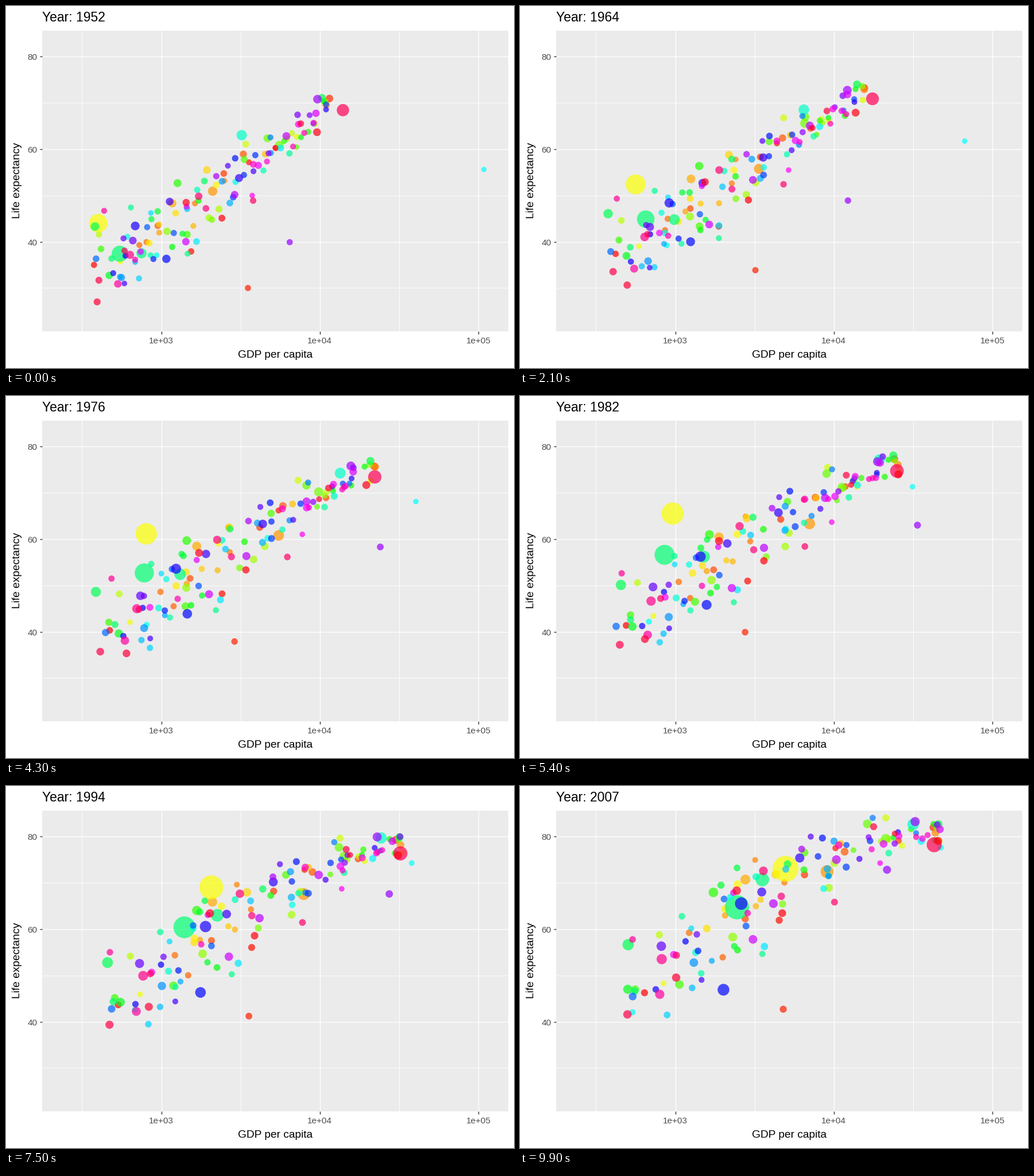
These frames come from a looping animation (885 px wide and 632 px high, 10 s). A matplotlib script:

```python
import numpy as np
import matplotlib.pyplot as plt
from matplotlib.animation import FuncAnimation
from matplotlib.colors import hsv_to_rgb
from matplotlib.patches import Rectangle

W, H, DPI = 885, 632, 100
LEFT, TOP, RIGHT, BOTTOM = 63, 43, 875, 568
FRAMES, COUNT = 100, 142
SURVEYS = np.arange(1952, 2008, 5)
PX = 72 / DPI  # points per pixel

plt.rcParams["font.family"] = "Liberation Sans"
rng = np.random.default_rng(4)


def lerp(a, b, t):
    return a + (b - a) * t


def to_x(log_gdp):
    return 270.5 + 276.2 * (log_gdp - 3)


def to_y(life):
    return 411.5 - 8.0875 * (life - 40)


def crowd():
    """Log gdp, life expectancy and population of every dot at each survey."""
    t = np.linspace(0, 1, len(SURVEYS))
    shape = COUNT, 1
    rank = rng.permutation((np.arange(COUNT) + 0.5) / COUNT).reshape(shape)
    rank = np.clip(rank + rng.normal(0, 0.09, shape) * t, 0, 1)
    offset = np.clip(rng.normal(size=shape), -2, 2)
    offset = offset + rng.normal(0, 0.5, shape) * t
    wobble = rng.normal(size=(2, COUNT, len(SURVEYS)))

    # The poor-to-rich curve bends upward at first and flattens later.
    gdp = lerp(2.55, 2.72, t) + rank * lerp(1.53, 1.93, t)
    life = lerp(36 + 34 * rank ** 1.4, 80.5 - 34 * (1 - rank) ** 1.7, t)
    spread = 1.2 + lerp(3.8, 4.6, t) * (1 - rank ** 2)
    pop = np.clip(rng.lognormal(1.5, 1.0, shape), 0.3, 40)
    pop = pop * lerp(1, lerp(3, 1.2, rank), t)
    return gdp + 0.02 * wobble[0], life + spread * offset + 0.3 * wobble[1], pop


# Dots that stand out: first and last population in millions,
# then (gdp, life) in 1952, 1982 and 2007.
LANDMARKS = {
    3: (4, 12, (3521, 30.0), (2757, 39.9), (4797, 42.7)),
    14: (57, 190, (2109, 50.9), (7031, 63.3), (9066, 72.4)),
    24: (556, 1319, (400, 44.0), (962, 65.5), (4959, 73.0)),
    58: (372, 1110, (547, 37.4), (856, 56.6), (2452, 64.7)),
    59: (82, 224, (750, 37.5), (1517, 56.2), (3541, 70.7)),
    66: (86, 127, (3217, 63.0), (19384, 77.1), (31656, 82.6)),
    71: (0.2, 2.5, (108382, 55.6), (31354, 71.3), (47307, 77.6)),
    94: (33, 135, (1077, 36.3), (1577, 45.8), (2014, 46.9)),
    97: (41, 169, (685, 43.4), (1443, 56.2), (2606, 65.5)),
    109: (4, 28, (6460, 39.9), (33693, 63.0), (21655, 72.8)),
    134: (158, 301, (13990, 68.4), (25010, 74.7), (42952, 78.2)),
}

gdp, life, pop = crowd()
for i, (first, last, *points) in LANDMARKS.items():
    g, e = np.transpose(points)
    gdp[i] = np.interp(SURVEYS, (1952, 1982, 2007), np.log10(g))
    life[i] = np.interp(SURVEYS, (1952, 1982, 2007), e)
    pop[i] = np.geomspace(first, last, len(SURVEYS))

xs, ys = to_x(gdp), to_y(life)
radii = 4.4 + 18.2 * np.sqrt(pop / 1319)

fig = plt.figure(figsize=(W / DPI, H / DPI), dpi=DPI, facecolor="white")
ax = fig.add_axes([0, 0, 1, 1])
ax.set_xlim(0, W)
ax.set_ylim(H, 0)
ax.axis("off")
ax.add_patch(Rectangle((LEFT, TOP), RIGHT - LEFT, BOTTOM - TOP, fc="#EBEBEB", lw=0))


def line(x, y, color="white", width=1.4):
    ax.plot(x, y, color=color, lw=width * PX, solid_capstyle="butt", zorder=1)


def label(x, y, text, size, color="black", **kw):
    return ax.text(x, y, text, fontsize=size * PX, color=color, va="baseline", **kw)


for v in (2.5, 3.5, 4.5):
    line([to_x(v)] * 2, [TOP, BOTTOM], width=0.9)
for v in (30, 50, 70):
    line([LEFT, RIGHT], [to_y(v)] * 2, width=0.9)
for v in (3, 4, 5):
    x = to_x(v)
    line([x, x], [TOP, BOTTOM])
    line([x, x], [BOTTOM, BOTTOM + 4.5], "#333333")
    label(x, 589, f"1e+0{v}", 15.2, "#4D4D4D", ha="center")
for v in (40, 60, 80):
    y = to_y(v)
    line([LEFT, RIGHT], [y, y])
    line([LEFT - 4.5, LEFT], [y, y], "#333333")
    label(54.5, y + 6, str(v), 15.2, "#4D4D4D", ha="right")

label(469, 614, "GDP per capita", 19.15, ha="center")
label(24.5, 305, "Life expectancy", 19.15, ha="center", rotation=90,
      rotation_mode="anchor")
title = label(63, 27, "", 22.9)

hues = np.arange(COUNT) / COUNT
colors = hsv_to_rgb(np.column_stack([hues, np.ones(COUNT), np.ones(COUNT)]))
cloud = ax.scatter(xs[:, 0], ys[:, 0], c=colors, alpha=0.7, linewidths=0, zorder=3)


def draw(frame):
    step = frame / (FRAMES - 1) * (len(SURVEYS) - 1)
    k = min(int(step), len(SURVEYS) - 2)

    def at(values):
        return lerp(values[:, k], values[:, k + 1], step - k)

    cloud.set_offsets(np.column_stack([at(xs), at(ys)]))
    cloud.set_sizes((2 * at(radii) * PX) ** 2)
    title.set_text(f"Year: {round(1952 + 5 * step)}")
    return cloud, title


anim = FuncAnimation(fig, draw, frames=FRAMES, interval=100, repeat=True)
plt.show()
```
